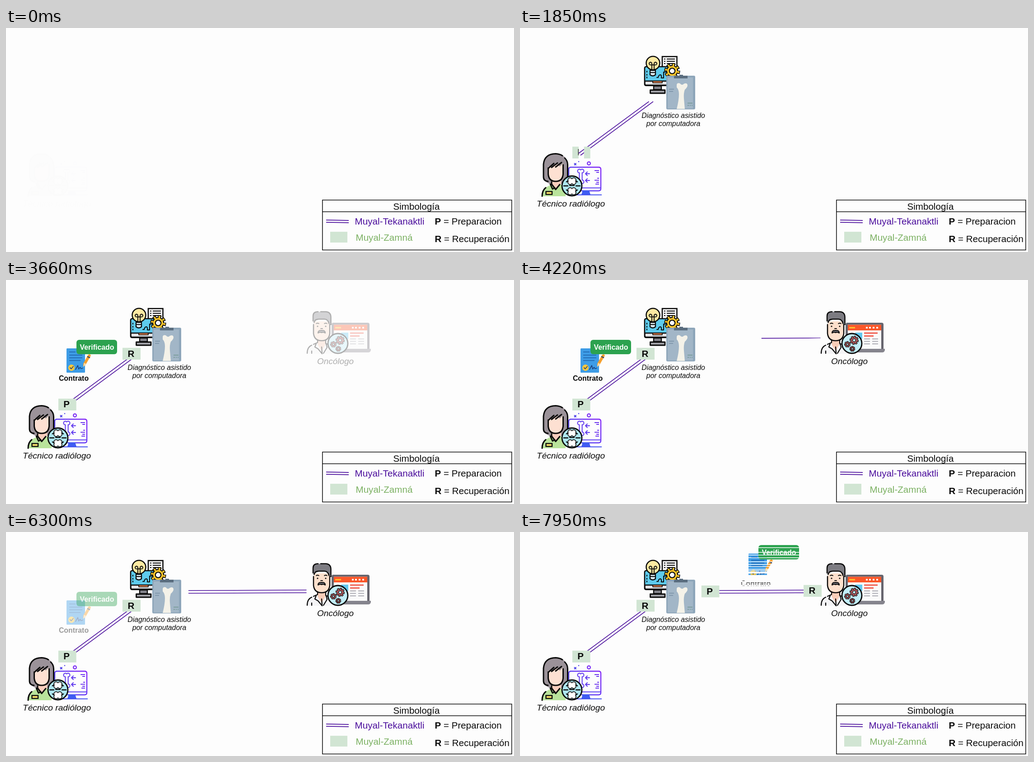
Write an HTML page that moves like this. It is 1125 px wide and 498 px high and loops after 7.99 s.

```html
<!DOCTYPE html>
<html lang="es">
<head>
<meta charset="utf-8">
<title>Flujo de preparación y recuperación</title>
<style>
html, body { margin: 0; width: 100%; height: 100%; overflow: hidden; background: #fdfdfd; }
svg { display: block; width: 100%; height: 100%; }
text { font-family: "Liberation Sans", Arial, sans-serif; }
</style>
</head>
<body>
<svg id="stage" viewBox="0 0 1125 498" fill="none"></svg>
<script>
const LOOP = 7990;
const PURPLE = '#4a0d9c', MINT = '#d1e5d3', INK = '#0a0a0a';

const rect = (x, y, w, h, fill, more = '') =>
  `<rect x="${x}" y="${y}" width="${w}" height="${h}" fill="${fill}" ${more}/>`;
const circle = (x, y, r, fill, more = '') =>
  `<circle cx="${x}" cy="${y}" r="${r}" fill="${fill}" ${more}/>`;
const path = (d, fill, stroke = 'none', w = 3) =>
  `<path d="${d}" fill="${fill}" stroke="${stroke}" stroke-width="${w}" stroke-linecap="round" stroke-linejoin="round"/>`;
const line = (d, color, w) => `<path d="${d}" stroke="${color}" stroke-width="${w}"/>`;
const text = (s, x, y, size, more = '') =>
  `<text x="${x}" y="${y}" font-size="${size}" fill="${INK}" ${more}>${s}</text>`;
const label = (s, x, y, size) => text(s, x, y, size, 'text-anchor="middle" font-style="italic"');
const group = (id, body, clipped) =>
  `<g id="${id}" ${clipped ? `clip-path="url(#${id}Clip)"` : ''}>${body}</g>`;
const edge = w => `stroke="${INK}" stroke-width="${w}"`;

// Upright bone: shaft plus two knobs at either end.
function bone(x, top, bottom, r, fill, stroke, w) {
  const pass = (color, grow) => [top, bottom].map(y =>
    circle(x - r, y, r + grow, color) + circle(x + r, y, r + grow, color)).join('') +
    rect(x - r * 0.7 - grow, top, r * 1.4 + grow * 2, bottom - top, color);
  return pass(stroke, w) + pass(fill, 0);
}

function gear(x, y, r, teeth, fill, hole, w) {
  const step = Math.PI * 2 * r / teeth;
  const cogs = (color, extra) =>
    circle(x, y, r, 'none', `stroke="${color}" stroke-width="${r * 0.45 + extra}"
      stroke-dasharray="${step * 0.45 + extra} ${step * 0.55 - extra}" stroke-dashoffset="${extra / 2}"`);
  return cogs(INK, w) + circle(x, y, r * 0.9, fill, edge(w)) + cogs(fill, -w / 2) +
    circle(x, y, r * 0.46, hole, edge(w));
}

const technician = `
  ${line('M138 355H112Q108 355 108 350V314Q108 309.500 113 309.500H174Q179 309.500 179 314V357Q179 362 174 362H136', 'url(#screen)', 2.4)}
  ${line('M134 355.500H178', '#5a3df2', 2)}
  ${path('M139 361H153L156 370H136Z', '#3f5cf2')}
  ${line('M125 371H181', '#4856f0', 2)}
  ${bone(134.5, 318, 342, 3, '#fdfdfd', '#5f38ee', 2)}
  ${path('M154 324H145M149 320L145 324L149 328M154 339H145M149 335L145 339L149 343', 'none', '#5f38ee', 2)}
  ${line('M165 317H175M169 321H175M171 334H175M165 338.500H175M169 343H175M167 347H175', '#6a32ee', 2)}
  ${path('M120.500 301L124 304.500M124 301L120.500 304.500', 'none', '#5146e8', 2)}
  ${circle(130, 297, 1.3, '#5146e8')}
  ${circle(152.500, 301, 3.4, 'none', 'stroke="#7a2cf4" stroke-width="2.2"')}
  ${path('M49 374Q49 357 62 352L72 346H87L101 354V374Z', '#b9e39b')}
  ${path('M49 374Q49 361 57 355', 'none', INK)}
  ${path('M52 333V303Q54 280 79 279.500Q104 280 105.500 304V334Q104 339 96 344L88 348L80 359L72 348Q52 343 52 333Z', '#9b9299')}
  ${path('M69 334V346L80 358L91 346V334Z', '#f8cdbd')}
  ${path('M62.500 308V325Q64 341 79 341Q94 341 95.500 325V301L88 308L83 303L70 310Z', '#fde0d2')}
  ${path('M62 341Q52 340 52 331V303Q54 280 79 279.500Q88 280 94 284M99 289Q105.500 295 105.500 304V330', 'none', INK)}
  ${path('M62.500 311V325Q64 341 79 341Q94 341 95.500 325V304M62.500 312L75 301M70 310L83 300M79 309L92 299', 'none', INK)}
  ${path('M70 342V347L79 359L88 348M67 347L72 358L77 355', 'none', INK)}
  ${rect(57.500, 363.500, 13.500, 6.500, '#fbe16b', edge(2.4))}
  ${circle(115, 351, 22, '#aee6ef', edge(2.8))}
  ${bone(115, 338, 343, 4, '#fff', INK, 1.8)}
  ${bone(115, 360, 366, 4, '#fff', INK, 1.8)}
  ${path('M97 351H106M124 351H133M110 350H120M103 342L106 340M127 342L124 340M103 360L106 362M127 360L124 362', 'none', INK, 2.4)}
  ${label('Técnico radiólogo', 112.500, 397, 19.15)}`;

const diagnosis = `
  ${rect(315, 63.500, 32.500, 30, '#f5f5f5', edge(2.6))}
  ${line('M319 69H322M325 69H343M319 74H322M325 74H343M319 79H322M325 79H343', INK, 2)}
  ${rect(276, 86, 56, 42, '#5ecbed', edge(2.6) + ' rx="3"')}
  ${path('M276.500 118H331V127H279Q276.500 127 276.500 124Z', '#e5e5e8', INK, 2.4)}
  ${path('M294 118H315V122H294Z', '#f08a55', INK, 1.6)}
  ${path('M296 129H313V137H296Z', '#85858d', INK, 2.4)}
  ${path('M288.500 138H321V145H288.500Z', '#a8a8ae', INK, 2.8)}
  ${path('M281 96V98M281 103V105M281 109V111', 'none', INK, 2)}
  ${path('M303 110H306Q307 104 311 104Q314 105 313 111H318V98H325', 'none', INK, 2)}
  ${path('M288 94V104Q294 109 300 104V94Z', '#d9e7ee', INK, 2.3)}
  ${circle(294.500, 78, 15, '#fdeaa2', edge(2.5))}
  ${path('M292 94V82Q285 83 286 78Q289 74 292 78V82H297V78Q300 74 303 78Q304 83 297 82V94M288 99H300', 'none', INK, 1.9)}
  ${gear(337, 95.500, 13.500, 8, '#fdc72d', '#fdfdfd', 2.2)}
  ${rect(324, 106, 64, 75, '#8ea6ba', 'rx="3"')}
  ${rect(327, 110, 56, 69, '#a2b6c7')}
  ${path('M343 106H353V104H361V106H371V112H341V108Z', '#5a6d7f')}
  ${path('M347 126Q348 121 354 123Q358 129 363 124Q370 121 371 127Q371 132 365 137Q362 145 363 157L365 180H347Q352 160 352 147Q352 137 347 132Z', '#f4f2e9')}
  ${line('M330 136H341M330 141H339', '#778fa4', 1.4)}
  ${line('M371 167H382M371 172H374M376 172H378M380 172H382', '#6f958f', 1.5)}
  ${label('Diagnóstico asistido', 339.500, 200, 15.8)}
  ${label('por computadora', 339.500, 218, 15.8)}`;

const oncologist = `
  ${rect(721, 95, 84, 61, '#66656e', 'rx="4"')}
  ${rect(726, 99.500, 74, 54, '#fafafa')}
  ${rect(726, 99.500, 74, 12.500, '#fb5729')}
  ${line('M729 106H742', '#fdc52d', 3)}
  ${line('M766 106H770M773 106H777M781 106H785M789 106H793', '#fff', 3.4)}
  ${rect(742, 117, 16, 14, '#64c8ee')}
  ${line('M762 118H792M762 124.500H783', '#ef4434', 2.4)}
  ${line('M762 131H775M780 131H793M762 136.500H775M780 136.500H793M762 142H775M780 142H793', '#aaaab2', 2.2)}
  ${path('M719 153H808V156Q807 161 802 161H722Z', '#85848d')}
  ${path('M667 164Q667 149 677 145L690 139H708L720 145L725 164Z', '#f4f4f6')}
  ${path('M690 130H708V142L699 158L690 143Z', '#f9cdb8')}
  ${path('M682 92V121Q684 133 699 135Q714 133 716 121V92Z', '#fde0cc')}
  ${path('M680 91V80Q680 70.500 691 70.500H708Q719 71 719.500 82V99L715 94Q711 86 704 87Q690 87 685 91L682 97Z', '#7d7c82')}
  ${path('M680 91V80Q680 70.500 691 70.500M697 70.500H708Q719 71 719.500 82V99M682.500 94Q684 86 695 87H705Q713 87 715.500 97M681 99V119Q683 135 699 135Q715 135 717 119V99', 'none', INK, 2.5)}
  ${path('M691 118Q691 111 699 112Q707 111 707 118Q703 115 699 117Q695 115 691 118Z', '#66656a', INK, 2)}
  ${circle(690, 103, 1.6, INK)}${circle(708, 103, 1.6, INK)}
  ${path('M687 97Q690 95 693 97M705 97Q708 95 711 97M697 108H701', 'none', INK, 1.8)}
  ${path('M667 163Q667 149 677 145M681 143L690 139V133M708 133V141L717 145M687 141L684 149L691 153L700 164M709 142L711 150L703 163M699 149L700 163M677 158V163', 'none', INK, 2.3)}
  ${circle(735, 141, 22, '#c2edf7', edge(2.8))}
  ${gear(740, 134, 7.6, 8, '#f2777d', '#c2edf7', 1.6)}
  ${gear(725, 143, 5.2, 7, '#f2777d', '#c2edf7', 1.4)}
  ${gear(736, 153, 4.6, 7, '#f2777d', '#c2edf7', 1.4)}
  ${label('Oncólogo', 729.500, 187, 18.9)}`;

const contract = `
  ${rect(134, 152, 41, 54, '#3d9ce6', 'rx="1.5"')}
  ${line('M140 160H154M140 167H169M140 173H169M140 179H165', '#1d5fa8', 1.6)}
  ${circle(145, 195, 7, '#fcc83c')}
  ${path('M142 195L144.500 197.500L149 192', 'none', '#314a6b', 1.8)}
  ${path('M154 199L159 190L161 198L164 194L166 197L170 196', 'none', '#1d3f79', 1.6)}
  ${path('M186 165L188 168L176 189L171 193L171 186L182 166Z', '#f7a02c')}
  ${path('M173 184L178 187L171 193Z', '#f6dca9')}
  ${line('M180 170L186 173', '#2d4468', 2.4)}
  ${text('Contrato', 150, 224, 15.9, 'text-anchor="middle" font-weight="bold"')}`;

const badge = rect(156, 133, 90, 32, '#2ca24f', 'rx="6"') +
  '<text x="201.500" y="155" font-size="15.9" font-weight="bold" fill="#fff" text-anchor="middle">Verificado</text>';

const tag = (s, x, y, tx, ty) => rect(x, y, 40, 26.5, MINT) +
  text(s, tx, ty, 20.6, 'text-anchor="middle" font-weight="bold"');

const legend = `
  ${rect(700.8, 382.5, 419.2, 111, 'none', edge(1.5))}
  ${line('M700.500 408.500H1120', INK, 1.6)}
  ${text('Simbología', 909, 404, 20.6, 'text-anchor="middle"')}
  ${line('M709 426.800L759 427.800M709 431.800L759 432.800', PURPLE, 1.7)}
  ${rect(718, 453, 38, 24, MINT)}
  <text x="772.500" y="437" font-size="20.7" fill="${PURPLE}">Muyal-Tekanaktli</text>
  <text x="774.500" y="473" font-size="20.6" fill="#7cb163">Muyal-Zamná</text>
  ${text('<tspan font-weight="bold">P</tspan> = Preparacion', 949.5, 437, 20.6)}
  ${text('<tspan font-weight="bold">R</tspan> = Recuperación', 949.5, 475.5, 20.6)}`;

// Tags open from both sides towards the middle: x, y, letter and start time.
const tags = [
  { id: 'p1', s: 'P', x: 115.8, y: 263.5, tx: 134, ty: 283, at: 1500 },
  { id: 'r1', s: 'R', x: 258, y: 150.5, tx: 277, ty: 170.5, at: 2000 },
  { id: 'p2', s: 'P', x: 401.6, y: 118.8, tx: 420, ty: 139, at: 6500 },
  { id: 'r2', s: 'R', x: 628, y: 117.5, tx: 647, ty: 137, at: 7000 }
];
const clipIds = ['link1', 'link2', 'deal2', ...tags.map(g => g.id)];

const stage = document.getElementById('stage');
stage.innerHTML = `
  <defs>
    <linearGradient id="screen" gradientUnits="userSpaceOnUse" x1="179" y1="309" x2="120" y2="362">
      <stop offset="0" stop-color="#8426f8"/><stop offset="1" stop-color="#4a4ef0"/>
    </linearGradient>
    ${clipIds.map(id => `<clipPath id="${id}Clip" clipPathUnits="userSpaceOnUse"><path id="${id}Shape"/></clipPath>`).join('')}
  </defs>
  ${rect(0, 0, 1125, 498, '#fdfdfd')}
  ${legend}
  ${group('technician', technician)}
  ${group('diagnosis', diagnosis)}
  ${group('oncologist', oncologist)}
  ${group('link1', line('M130 278.500L285.500 163.500M134 283L295 163.500', PURPLE, 1.6), true)}
  ${group('link2', line('M404 130.200L665.500 129M404 136.200L665.500 135', PURPLE, 1.6), true)}
  ${tags.map(g => group(g.id, tag(g.s, g.x, g.y, g.tx, g.ty), true)).join('')}
  ${group('deal1', contract)}
  ${group('badge1', badge)}
  ${group('deal2', `<g transform="translate(372 -104)">${contract}${badge}</g>`, true)}`;

const el = Object.fromEntries([...stage.querySelectorAll('[id]')].map(n => [n.id, n]));
const ramp = (t, at, span = 500) => Math.min(1, Math.max(0, (t - at) / span));
const box = (x, y, w, h) => w > 0 && h > 0 ? `M${x} ${y}h${w}v${h}h${-w}z` : '';
const fade = (id, v) => el[id].setAttribute('opacity', v);
const clip = (id, d) => el[id + 'Shape'].setAttribute('d', d || 'M0 0');

// Clockwise sweep from the top, squeezed to the flat shape of the link.
function wheel(p) {
  if (p <= 0) return '';
  if (p >= 1) return box(390, 110, 290, 45);
  const n = 60, cx = 534.75, cy = 132.6;
  let d = `M${cx} ${cy}`;
  for (let i = 0; i <= n; i++) {
    const a = p * Math.PI * 2 * i / n;
    d += `L${cx + Math.sin(a) * 1305} ${cy - Math.cos(a) * 26}`;
  }
  return d + 'z';
}

// Each thin row has a fixed random moment at which it appears.
let seed = 11;
const random = () => (seed = seed * 16807 % 2147483647) / 2147483647;
const rows = Array.from({ length: 62 }, random);
const bars = p => rows.map((r, i) => r < p ? box(485, 28 + i * 1.5, 140, 1.5) : '').join('');

function draw(t) {
  fade('technician', ramp(t, 0));
  fade('diagnosis', ramp(t, 500));
  fade('oncologist', ramp(t, 3500));
  const leave = 1 - ramp(t, 6000);
  fade('deal1', ramp(t, 2500) * leave);
  fade('badge1', ramp(t, 3000) * leave);
  const rise = 121 * ramp(t, 1000);
  clip('link1', box(120, 284 - rise, 185, rise));
  clip('link2', wheel(ramp(t, 4000, 2000)));
  for (const g of tags) {
    const w = 20 * ramp(t, g.at);
    clip(g.id, box(g.x, g.y, w, 27) + box(g.x + 40 - w, g.y, w, 27));
  }
  clip('deal2', bars(ramp(t, 7500, 680)));
}

const start = performance.now();
function tick() {
  draw((performance.now() - start) % LOOP);
  requestAnimationFrame(tick);
}
draw(0);
requestAnimationFrame(tick);
</script>
</body>
</html>
```
